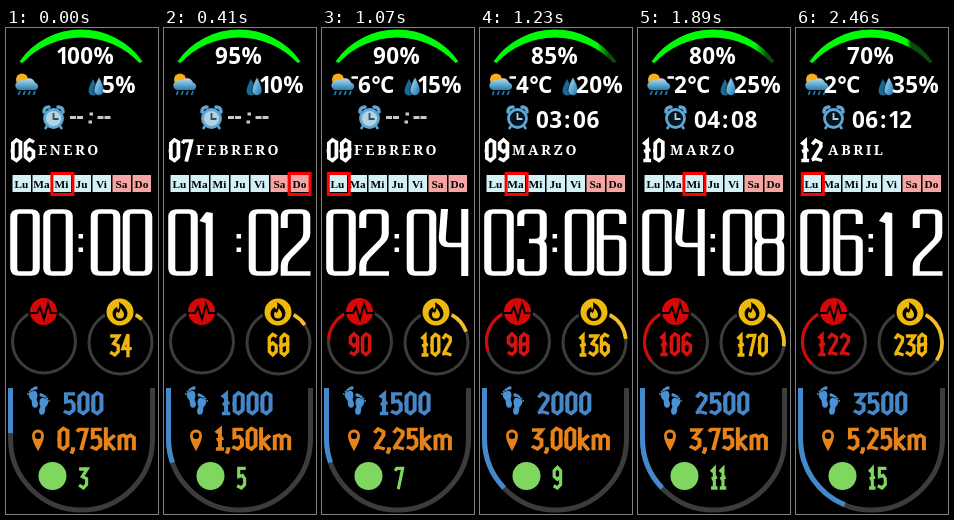
Animation of 152x486 px, one loop 2.87 s. Source, as an HTML page:

```html
<!DOCTYPE html>
<html lang="es">
<head>
<meta charset="utf-8">
<title>Watch face</title>
<style>
html, body { margin: 0; width: 100%; height: 100%; overflow: hidden; background: #000; }
svg { display: block; width: 100vw; height: 100vh; }
path { fill: none; }
.sans { font: 700 22.5px "Open Sans", "Noto Sans", sans-serif; fill: #fff; }
.month { font: 900 14px "Noto Serif", serif; letter-spacing: 2.6px; fill: #fff; }
.week { font: 700 11.3px "Liberation Serif", serif; text-anchor: middle; }
.track { stroke: #3c3c3c; }
</style>
</head>
<body>
<svg viewBox="0 0 152 486">
  <defs>
    <linearGradient id="charge" gradientUnits="userSpaceOnUse" y1="0" y2="0">
      <stop stop-color="#00fa08"/><stop offset="1" stop-color="#0a4a0a"/>
    </linearGradient>
    <linearGradient id="cloud" x2="0" y2="1">
      <stop stop-color="#b9dcec"/><stop offset="1" stop-color="#1f7fb4"/>
    </linearGradient>
    <linearGradient id="drop" x2="1" y2="1">
      <stop stop-color="#b5e6fb"/><stop offset="1" stop-color="#1672ae"/>
    </linearGradient>
  </defs>
  <rect width="152" height="486"/>
  <path d="M13.500 33.500A75 75 0 0 1 136.500 33.500L133.500 35A80 80 0 0 0 16.500 35Z" style="fill:url(#charge)"/>

  <!-- weather -->
  <circle cx="16" cy="51.500" r="6" fill="#f9ad1a"/>
  <path d="M13 62a4.500 4.500 0 0 1-1-8.500a5 5 0 0 1 6-1a6.500 6.500 0 0 1 11 2a4 4 0 0 1 1 7.500Z" style="fill:url(#cloud)"/>
  <path d="M14 63l-1.500 4M19 63l-1.500 4M24 63l-1.500 4M29 63l-1.500 4" stroke="#1d7fb8" stroke-width="1.700"/>
  <path d="M87 51q-4.500 8-4.500 12a4.600 4.600 0 0 0 9.200 0q0-4-4.700-12Z" style="fill:#1b6894"/>
  <path d="M93 49q-5 9-5 13.500a5 5 0 0 0 10 0q0-4.500-5-13.500Z" style="fill:url(#drop)" stroke="#000" stroke-width=".6"/>

  <!-- alarm -->
  <g id="alarm" stroke="#5fa8d6">
    <path d="M38 84q0-5 5-5M52 79q5 0 5 5" stroke-width="3.500" stroke-linecap="round"/>
    <path d="M41 98l-2 3M54 98l2 3" stroke-width="2.500"/>
    <circle id="dial" cx="47.500" cy="90.500" r="9" stroke-width="2.800"/>
    <path id="hands" d="M47.500 85v6h5" stroke-width="1.800"/>
  </g>
  <path id="unset" d="M64 89.500h6M71 89.500h6M91.500 89.500h6M98.500 89.500h6M83.500 86h3.500M82.500 94h3.500" stroke="#c9c9c9" stroke-width="3"/>
  <g id="info"></g>

  <g id="days"></g>
  <rect id="today" y="145.500" width="21" height="21" fill="none" stroke="#f00" stroke-width="3"/>
  <g id="clock"></g>
  <path d="M74.800 206v4.500M74.800 219.500v4.500" stroke="#fff" stroke-width="4.500"/>

  <!-- rings -->
  <g stroke-width="3">
    <circle class="track" cx="38" cy="313.500" r="31.500" fill="none"/>
    <circle class="track" cx="114.500" cy="314.500" r="31.500" fill="none"/>
    <path id="pulse" stroke="#d90808"/>
    <path id="burn" stroke="#f2be2e" stroke-width="3.800"/>
  </g>
  <g stroke="#000" stroke-width="2">
    <circle cx="37.500" cy="283.500" r="14.500" fill="#d40808"/>
    <circle cx="114" cy="284" r="14.500" fill="#efb80d"/>
    <path d="M23 285h8l3-6 4 12 4-15 3 9h7"/>
  </g>
  <path d="M113 274q8 5 8.500 11a7.500 7.500 0 0 1-15 1q0-5 4.500-7l1 3q2-3 1-8Z" style="fill:#000"/>
  <path d="M114.500 280q3.500 4 3.500 6.500a4 4 0 0 1-8 0q0-1.500 1-3l1.500 1.500q2-2 2-5Z" style="fill:#efb80d"/>

  <!-- activity -->
  <path class="track" d="M4.500 360V411A71 71 0 0 0 146.500 411V360" stroke-width="5"/>
  <path id="walk" d="M4.500 360V411A71 71 0 0 0 146.500 411V360" stroke="#4389cb" stroke-width="5"/>
  <g id="feet" fill="#4a92d3"></g>
  <path d="M32 401.500a6 6 0 0 1 6 6.200q0 5-6 15.500q-6-10.500-6-15.500a6 6 0 0 1 6-6.200Z" style="fill:#e5821a"/>
  <circle cx="32" cy="407.700" r="3.200"/>
  <circle cx="46.500" cy="448" r="14" fill="#80d760"/>
  <g id="stats" stroke-width="2.900" stroke-miterlimit="4"></g>
</svg>
<script>
const STEP = 410, COUNT = 7;
const $ = id => document.getElementById(id);
const pad = n => String(n).padStart(2, "0");

// Tall rounded clock digits, 20 x 67 units
const top67 = "V8Q2.500 2.500 6 2.500H14Q17.500 2.500 17.500 8";
const low67 = "V59Q17.500 64.500 14 64.500H6Q2.500 64.500 2.500 59";
const tall = {
  0: `M2.500 59${top67}${low67}Z`,
  1: "M1 13L5.500 4V67",
  2: `M2.500 19${top67}V24Q17.500 29 15.500 32L5 48Q2.500 52 2.500 57V64.500H20`,
  3: `M2.500 17${top67}V26Q17.500 32 12 32H8M12 32Q17.500 32 17.500 38${low67}V50`,
  4: "M4 0L2.500 29Q2.500 36 7 36H17.500M17.500 0V67",
  5: `M18.500 2.500H3V29H14Q17.500 29 17.500 34${low67}V50`,
  6: `M17.500 15V8Q17.500 2.500 14 2.500H6Q2.500 2.500 2.500 8V59Q2.500 64.500 6 64.500H14Q17.500 64.500 17.500 59V34Q17.500 28.500 14 28.500H2.500`,
  8: `M6 32Q2.500 31 2.500 26${top67}V26Q17.500 31 14 32Q17.500 33 17.500 38${low67}V38Q2.500 33 6 32ZH14`
};

// Angular blackletter characters, 10 x 22 units
const gothic = {
  0: "M2.200 5L5 2 8 4V17L5 20 2.200 18ZM.5 11.500H3M7 10.500H9.500",
  1: "M1 6L4 3V20M1 20H7M1.500 12L6.500 10.500",
  2: "M1.500 6L4 2.500 8 5V8L2.500 18M1 19.500L4 18.500 9 20",
  3: "M1 3.500H8.500L4 10 8 12V17L5 20 1 17.500",
  4: "M6.500 22V2L2 14.500H9.800",
  5: "M9 3H2.500V10L6 9 8 12V17L5 20 1 18",
  6: "M8.500 4L5 2 2 5V17L5 20 8 17V12L5 9.500 2 12",
  7: "M1 5L2.500 3H8L4 21",
  8: "M2.200 5L5 2 8 4V17L5 20 2.200 18ZM.5 12.500L9.500 9.500",
  9: "M1.500 18L5 20 8 17V5L5 2 2 5V10L5 12.500 8 10",
  ".": "M2 18.500V21L.8 24",
  k: "M2 1V21M8.500 8L3 13.500 8.500 21",
  m: "M2 21V9L5 8 7 10V21M7 10L10 8 12.500 10V21"
};
const narrow = { 1: 8, ".": 4, m: 15 };
const cell = c => narrow[c] || 10;

function gothicText(str, x, y, color, sx = 1.330, centered = false) {
  const width = [...str].reduce((w, c) => w + cell(c), 0);
  let pos = centered ? -width / 2 : 0;
  const paths = [...str].map(c => {
    const p = `<path transform="translate(${pos})" d="${gothic[c]}"/>`;
    pos += cell(c);
    return p;
  });
  return `<g transform="translate(${x} ${y}) scale(${sx} 1.150)" stroke="${color}">${paths.join("")}</g>`;
}

// Each character sits in its own cell; the 1 is cropped
function sansText(str, x, y) {
  const adv = { 1: 10, ":": 10.500, "%": 20, "°": 8.800 };
  const xs = [...str].map(c => {
    const at = x + (c === "1" ? -1 : c === ":" ? 1.500 : 0);
    x += adv[c] || 13.300;
    return at;
  });
  return `<text class="sans" x="${xs.join(" ")}" y="${y}">${str}</text>`;
}

function arc(cx, cy, r, from, to) {
  const pt = a => {
    const t = a * Math.PI / 180;
    return `${cx + r * Math.sin(t)} ${cy - r * Math.cos(t)}`;
  };
  return `M${pt(from)}A${r} ${r} 0 0 ${to > from ? 1 : 0} ${pt(to)}`;
}

function foot(x, y, flip) {
  const toes = [0, 1, 2, 3, 4].map(k =>
    `<circle cx="${4 - k * 2.200}" cy="${-7.500 + k * k * .3}" r="${1.700 - k * .2}"/>`).join("");
  return `<g transform="translate(${x} ${y}) scale(${flip} 1) rotate(-8)">${toes}
    <path d="M1-5C6-5 5 1 3 4C5 9 3 12 1 12C-3 12-2 7-2 4C-6-1-4-5 1-5Z" style="fill:#4a92d3"/></g>`;
}
$("feet").innerHTML = foot(27, 368, 1) + foot(38, 375, -1);

const names = ["Lu", "Ma", "Mi", "Ju", "Vi", "Sa", "Do"];
const months = ["ENERO", "FEBRERO", "MARZO", "ABRIL"];
const today = [2, 6, 0, 1, 2, 6, 0];
const charge = [[150, 10], [117, 12], [114, 8], [111, 4]];

function show(i) {
  const pair = Math.ceil(i / 2), hour = pad(i), minute = pad(2 * i);
  const [edge, fade] = charge[Math.max(0, i < 4 ? i - 2 : i - 3)];
  $("charge").setAttribute("x1", edge);
  $("charge").setAttribute("x2", edge + fade);

  const armed = i > 2;
  $("unset").style.display = armed ? "none" : "";
  $("alarm").setAttribute("transform", `translate(${armed ? -10 : 0})`);
  $("dial").setAttribute("fill", armed ? "#07131c" : "#b4d2e0");
  $("hands").setAttribute("stroke", armed ? "#a8d4ee" : "#24536f");

  let info = sansText(100 - 5 * i + "%", 51, 36) + sansText(5 * (i + 1) + "%", 96, 65);
  if (i > 1) {
    const temp = 2 * i - 10;
    info += sansText(Math.abs(temp) + "°C", temp < 0 ? 36 : 28, 65);
    if (temp < 0) info += '<path d="M29.500 49.500h6.500" stroke="#fff" stroke-width="2.500"/>';
  }
  if (armed) info += sansText(hour + ":" + minute, 56, 99.500);
  $("info").innerHTML = info + `<text class="month" x="32" y="126.500">${months[pair]}</text>`;

  $("days").innerHTML = names.map((n, k) =>
    `<rect x="${6.500 + 20 * k}" y="147" width="18.500" height="17" fill="${k > 4 ? "#f6a5a5" : "#d4f0f7"}"/>
      <text class="week" x="${15.500 + 20 * k}" y="159.500">${n}</text>`).join("");
  $("today").setAttribute("x", 6.300 + 19.800 * today[i]);

  const slots = [4, 37, 84.500, 116.500];
  $("clock").innerHTML = [...hour + minute].map((c, k) =>
    `<path transform="translate(${slots[k]} 181) scale(1.500 1)" d="${tall[c]}" stroke="#fff" stroke-width="4.700"/>`).join("");

  const beat = 74 + 8 * i, kcal = 34 * (i + 1);
  $("pulse").setAttribute("d", i > 1 ? arc(38, 313.500, 31.500, -25, -Math.min(135, 87 + 2.600 * (beat - 90))) : "");
  $("burn").setAttribute("d", arc(114.500, 314.500, 31.500, 29, 29 + .4 * kcal));
  $("walk").setAttribute("stroke-dasharray", `${45 + 30 * pair} 400`);

  $("stats").innerHTML =
    gothicText(pad(6 + i), 4, 109.500, "#fff", 1.300) +
    (i > 1 ? gothicText(String(beat), 38, 303.500, "#d51212", 1.200, true) : "") +
    gothicText(String(kcal), 114.500, 304, "#f0b60c", 1.150, true) +
    gothicText(String(500 * (i + 1)), 56.500, 362.500, "#4687c8", 1.390) +
    gothicText((.75 * (i + 1)).toFixed(2) + "km", 50.500, 398, "#e5821a", 1.370) +
    gothicText(String(3 + 2 * i), 72, 437, "#80d760", 1.080);
}

let shown = -1;
function tick() {
  const i = Math.floor(performance.now() / STEP) % COUNT;
  if (i !== shown) show(shown = i);
  requestAnimationFrame(tick);
}
tick();
</script>
</body>
</html>
```
